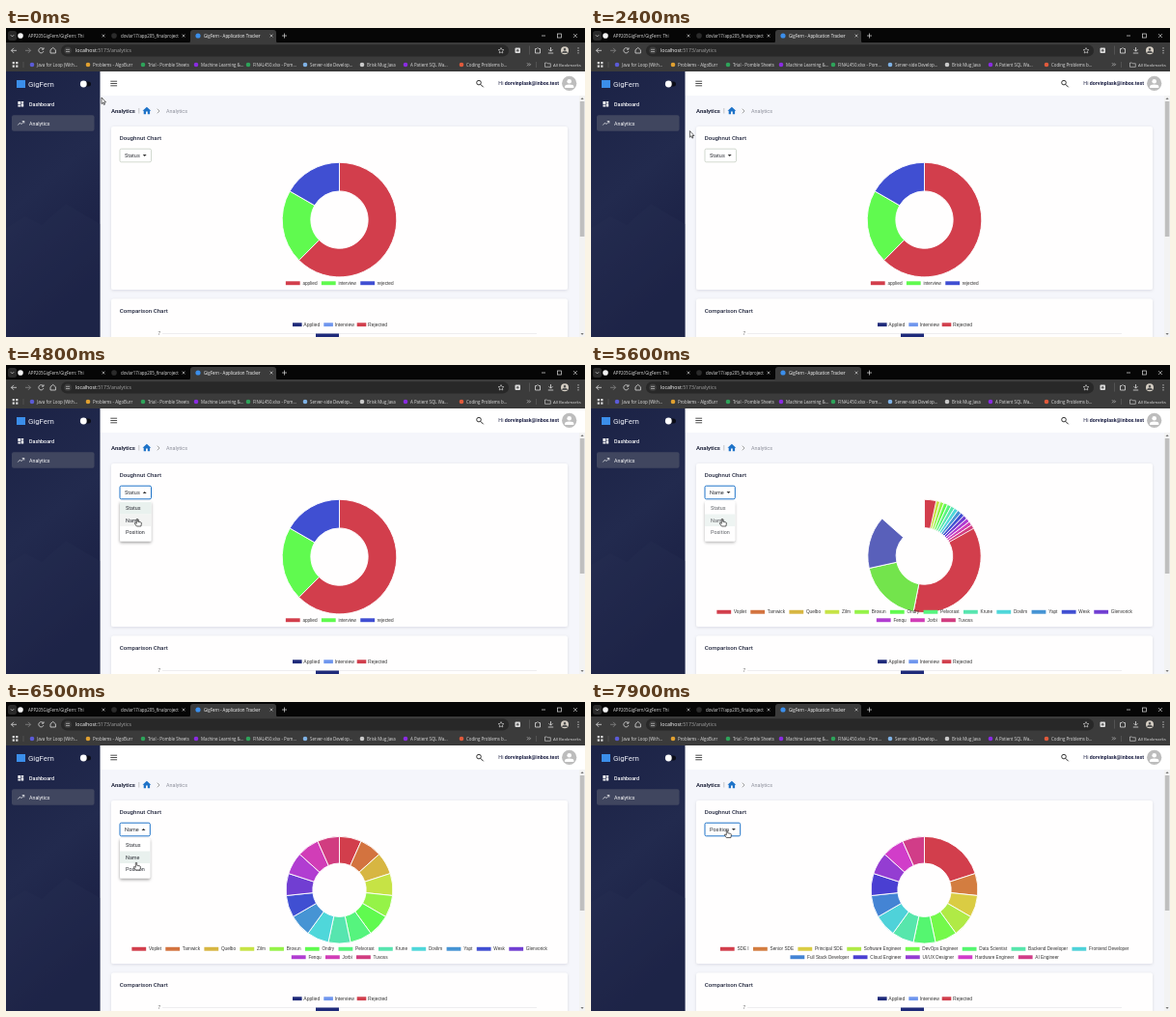
Recreate the animation shown at these times as an HTML page. Size 600 px wide and 320 px high, loop 8 s.

```html
<!DOCTYPE html>
<html lang="en">
<head>
<style>
  html, body { margin: 0; width: 100%; height: 100%; overflow: hidden; background: #f5f6fb; }
  svg { display: block; width: 600px; height: 320px; font-family: Roboto, sans-serif; }
  .chrome { font-family: "Open Sans", sans-serif; }
  .chart { font-family: "Liberation Sans", Arial, sans-serif; }
</style>
</head>
<body>
<svg viewBox="0 0 600 320">
  <defs>
    <linearGradient id="navy" x2=".3" y2="1">
      <stop offset="0" stop-color="#1b2245"/><stop offset=".5" stop-color="#222a4e"/><stop offset="1" stop-color="#191e42"/>
    </linearGradient>
    <filter id="soft" x="-20%" y="-20%" width="140%" height="140%">
      <feDropShadow dx="0" dy=".8" stdDeviation="1.4" flood-color="#223" flood-opacity=".12"/>
    </filter>
    <filter id="lift" x="-30%" y="-30%" width="160%" height="170%">
      <feDropShadow dx="0" dy="1.5" stdDeviation="1.6" flood-opacity=".4"/>
    </filter>
  </defs>
  <g id="page"></g>
  <g id="live"></g>
</svg>
<script>
const LOOP = 8000, STEP = 100, CX = 345.5, BLUE = '#1e73c8', INK = '#23283f';

const text = (x, y, s, size, fill, more = '') =>
  `<text x="${x}" y="${y}" font-size="${size}" fill="${fill}" ${more}>${s}</text>`;
const rect = (x, y, w, h, fill, more = '') =>
  `<rect x="${x}" y="${y}" width="${w}" height="${h}" fill="${fill}" ${more}/>`;
const circle = (x, y, r, fill, more = '') => `<circle cx="${x}" cy="${y}" r="${r}" fill="${fill}" ${more}/>`;
const shape = (d, fill, more = '') => `<path d="${d}" fill="${fill}" ${more}/>`;
const line = (d, stroke, width = .8) => shape(d, 'none', `stroke="${stroke}" stroke-width="${width}"`);
const clamp = v => Math.max(0, Math.min(1, v));
const mix = (a, b, k) => a + (b - a) * k;

function browser() {
  const light = '#dedede', cross = (x, y, r = 1.4) => line(`M${x - r} ${y - r}l${2 * r} ${2 * r}m0 ${-2 * r}l${-2 * r} ${2 * r}`, light, .6);
  const marks = [
    [27, '#5b5bd6', 'Java for Loop (With...'], [85, '#e0a030', 'Problems - AlgoBurr'],
    [142, '#2ea35a', 'Trial - Pomble Sheets'], [197, '#8a2be2', 'Machine Learning &amp;...'],
    [251, '#2ea35a', 'FINAL450.xlsx - Pom...'], [310, '#7fb2e5', 'Server-side Develop...'],
    [369, '#c9c9c9', 'Brisk Mug Java'], [414, '#8a2be2', 'A Patient SQL Wa...'], [472, '#e05a3c', 'Coding Problems b...'],
  ];
  return '<g class="chrome">' + rect(0, 0, 600, 16, '#060606') + rect(0, 15, 600, 30, '#3b3b3b') +
    rect(2, 3, 9, 10, '#2a2a2a', 'rx="2.5"') + line('M4.8 7.2l1.7 1.7 1.7-1.7', light, .7) +
    shape('M188 16q3 0 3-3V5q0-3 3-3H277q3 0 3 3v8q0 3 3 3z', '#3b3b3b') +
    circle(15, 8, 2.8, '#f4f4f4') + text(23, 9.8, 'APP205GigFern/GigFern: Thi', 4.4, light) + cross(101, 8) +
    circle(112, 8, 2.8, '#2b2b2b') + text(119, 9.8, 'dovlar17/app205_finalproject', 4.4, light) + cross(184, 8) +
    circle(199, 8, 2.6, '#3b8eea') + text(205, 9.8, 'GigFern - Application Tracker', 4.4, '#fff') + cross(275, 8) +
    line('M286 8h5m-2.5-2.5v5M555 8h4', light, .7) + rect(571.5, 6, 4, 4, 'none', `stroke="${light}" stroke-width=".7"`) + cross(590, 8, 2) +
    rect(57, 17.2, 464, 12.4, '#282828', 'rx="6.2"') +
    line('M11 23.3H5.5m2.5-2.5l-2.5 2.5 2.5 2.5', light) + line('M20 23.3h5.5m-2.5-2.5l2.5 2.5-2.5 2.5', '#888') +
    line('M38.5 21.7a2.6 2.6 0 1 0 .4 2.4M39 20.3v1.8h-2', light) + line('M46 26v-3.3l2.7-2.3 2.7 2.3V26z', light) +
    circle(64, 23.3, 3.8, '#3d3d3d') + line('M62 22.3h4m-4 2.2h4', light, .6) +
    text(72, 25.3, 'localhost<tspan fill="#a5a5a5">:5173/analytics</tspan>', 5.2, '#fff') +
    line('M513 20.5l.9 1.9 2 .2-1.5 1.4.4 2-1.8-1-1.8 1 .4-2-1.5-1.4 2-.2z', light, .6) +
    rect(527.5, 20.5, 5.5, 5.5, '#ddd', 'rx="1"') + circle(530.2, 23.2, 1.3, '#666') +
    line('M542.5 18.5v9', '#666', .6) + line('M548.5 21.5h1.5q1-2 2 0h1.5v4.5h-5z', light) +
    line('M564.5 20v4m-2-1.8l2 2 2-2M561.8 26h5.4', light) +
    circle(579, 23.3, 4, '#d8d1c6') + shape('M576.2 26a2.8 2.6 0 0 1 5.6 0z', '#555') + circle(579, 22, 1.3, '#555') +
    [20.8, 23.3, 25.8].map(y => circle(593, y, .65, light)).join('') +
    [0, 3.5].map(i => rect(6.7 + i, 35, 2.2, 2.2, light) + rect(6.7 + i, 38.5, 2.2, 2.2, light)).join('') +
    line('M18 35v6M549.5 35v6', '#6a6a6a', .5) +
    marks.map(([x, fill, s]) => circle(x, 38, 2.3, fill) + text(x + 5, 39.7, s, 4.4, light)).join('') +
    line('M540 36.3l1.5 1.5-1.5 1.5m2-3l1.5 1.5-1.5 1.5', light, .6) +
    line('M558.5 36h2l.8.8h3V40.3h-5.8z', light, .6) + text(567, 39.7, 'All Bookmarks', 4.3, light) + '</g>';
}

function sidebar() {
  return rect(0, 45, 97.5, 275, 'url(#navy)') +
    shape('M0 207l20-12 17 9 25-22 35.5 21V320H0z', '#262e52', 'opacity=".35"') +
    rect(11, 54, 9, 8, '#3b8eea') + text(23, 61, 'GigFern', 7.8, '#eef0f8') +
    rect(78, 55.6, 10, 5, '#0b0d18', 'rx="2.5"') + circle(80.3, 58, 3.4, '#fff') +
    rect(12.4, 76, 2.7, 3.2, '#fff') + rect(12.4, 79.8, 2.7, 1.7, '#fff') +
    rect(15.7, 76, 2.5, 1.7, '#fff') + rect(15.7, 78.3, 2.5, 3.2, '#fff') +
    text(24, 80.8, 'Dashboard', 5.35, '#fff', 'font-weight="500"') +
    rect(6, 90.3, 85.5, 16.5, '#40465f', 'rx="2"') +
    line('M12.3 100.5l2.2-2.3 1.4 1.4 2.8-3m-2-.1h2.1v2.1', '#fff', .7) +
    text(24, 100.5, 'Analytics', 5.3, '#fff');
}

function content() {
  const key = (x, fill, s) => rect(x, 305.3, 9.6, 3.8, fill) + text(x + 11.3, 309, s, 5.1, '#333');
  return rect(97.5, 45, 502.5, 275, '#f5f6fb') + rect(97.5, 45, 502.5, 25, '#fff') +
    line('M108.3 55.2h6.8m-6.8 2.3h6.8m-6.8 2.3h6.8', '#222', .8) +
    circle(490, 56.6, 2.3, 'none', 'stroke="#222" stroke-width=".9"') + line('M491.7 58.3l3 3', '#222', 1) +
    text(573, 59.3, 'Hi <tspan font-weight="700">dorvinplask@inbox.test</tspan>', 5.3, '#1d2145', 'text-anchor="end"') +
    circle(583.7, 57.4, 7.6, '#bdbdbd') + circle(583.7, 55.3, 2.3, '#fff') + shape('M579 62v-1.2q0-2.4 4.7-2.4t4.7 2.4V62z', '#fff') +
    text(109, 88, 'Analytics', 6, '#20253c', 'font-weight="700"') + line('M137.8 83v5.5', '#999', .5) +
    shape('M141.5 85.8l4.4-4 4.4 4h-1.2v3.4h-2.3v-2.6h-1.8v2.6h-2.3v-3.4z', BLUE) +
    line('M156.8 83.7l2.3 2.3-2.3 2.3', '#888', .8) + text(166, 88, 'Analytics', 5.4, '#8b8e99') +
    rect(109, 102, 473, 169, '#fffefe', 'rx="2.5" filter="url(#soft)"') +
    rect(109, 280.5, 473, 50, '#fffefe', 'rx="2.5" filter="url(#soft)"') +
    text(117.7, 116.2, 'Doughnut Chart', 6.15, INK, 'font-weight="500"') +
    text(117.7, 294.6, 'Comparison Chart', 6.15, INK, 'font-weight="500"') +
    '<g class="chart">' + key(297, '#1e2a7a', 'Applied') + key(329.3, '#6f96ee', 'Interview') + key(363.7, '#d13f4d', 'Rejected') +
    text(157.5, 318, '7', 4.7, '#666') + line('M162 316.5H550', '#e3e3e6', .6) + rect(321, 316.5, 24, 4, '#1e2a7a') + '</g>' +
    rect(594, 70, 6, 250, '#f3f3f3') + rect(594.8, 76, 4.6, 140, '#bfbfbf') +
    shape('M595.5 74l1.6-2 1.6 2zM595.5 316l1.6 2 1.6-2z', '#777');
}

// Colour wheel position t (0..1) to fill, strongest around green.
function wheel(t) {
  const bump = (mid, width) => Math.exp(-(((t - mid) / width) ** 2));
  const hue = 354 + 360 * t + 5 * Math.sin(3 * Math.PI * t);
  return `hsl(${hue % 360}, ${62 + 33 * bump(.333, .13)}%, ${53 + 12 * bump(.37, .18)}%)`;
}

function makeView(name, labels, weights, perRow, cy, r, width) {
  const total = weights.reduce((a, b) => a + b);
  let sum = 0;
  const arcs = weights.map((w, i) => ({ start: sum / total, end: (sum += w) / total, fill: wheel(i / labels.length) }));
  return { name, labels, arcs, perRow, cy, r, width };
}

const companies = ['Voplet', 'Tarnwick', 'Quelbo', 'Zilm', 'Brovun', 'Ondry', 'Pelvorast', 'Krune', 'Dovlim',
  'Yapt', 'Wesk', 'Glenvorick', 'Fenqu', 'Jorbi', 'Tuvoss'];
const roles = ['SDE I', 'Senior SDE', 'Principal SDE', 'Software Engineer', 'DevOps Engineer', 'Data Scientist',
  'Backend Developer', 'Frontend Developer', 'Full Stack Developer', 'Cloud Engineer', 'UI/UX Designer',
  'Hardware Engineer', 'AI Engineer'];
const views = [
  makeView('Status', ['applied', 'interview', 'rejected'], [15, 5, 4], 3, 198.6, 59.3, 32.5),
  makeView('Name', companies, companies.map(() => 1), 12, 194.7, 55.4, 31.3),
  makeView('Position', roles, roles.map((_, i) => i ? 1 : 3), 8, 194.7, 55.4, 36.7),
];

function doughnut(from, to, k) {
  const cy = mix(from.cy, to.cy, k), r = mix(from.r, to.r, k);
  const at = (turn, rad) => {
    const a = turn * 2 * Math.PI;
    return `${(CX + rad * Math.sin(a)).toFixed(2)} ${(cy - rad * Math.cos(a)).toFixed(2)}`;
  };
  return to.arcs.map((b, i) => {
    const a = from.arcs[i] || { start: 0, end: 0, fill: b.fill };
    const s = mix(a.start, b.start, k), e = mix(a.end, b.end, k), big = +(e - s > .5);
    if (e - s < .001) return '';
    return shape(`M${at(s, r)}A${r} ${r} 0 ${big} 1 ${at(e, r)}L${at(e, r / 2)}A${r / 2} ${r / 2} 0 ${big} 0 ${at(s, r / 2)}z`,
      k === 1 ? b.fill : `color-mix(in srgb, ${b.fill} ${k * 100}%, ${a.fill})`, 'stroke="#fff" stroke-width=".9"');
  }).join('');
}

const ruler = document.createElement('canvas').getContext('2d');
ruler.font = '47px "Liberation Sans", Arial, sans-serif';

function legend({ labels, arcs, perRow }) {
  const size = 4.7, box = 15.6, gap = 3.9, rows = Math.ceil(labels.length / perRow);
  const span = s => box + size / 2 + ruler.measureText(s).width / 10;
  let out = '';
  for (let row = 0; row < rows; row++) {
    const items = labels.slice(row * perRow, (row + 1) * perRow), y = 264.3 - (rows - 1 - row) * 8.5;
    let x = CX - (items.reduce((w, s) => w + span(s), 0) + gap * (items.length - 1)) / 2;
    items.forEach((s, i) => {
      out += rect(x + .4, y - 2, box - .8, 3.9, arcs[row * perRow + i].fill) + text(x + box + size / 2, y + 1.6, s, size, '#333');
      x += span(s) + gap;
    });
  }
  return `<g class="chart">${out}</g>`;
}

function select(view, open, focused) {
  const x = 118 + view.width - 6.8, dir = open ? -1 : 1;
  return rect(118, 125.2, view.width, 13.6, '#fff', `rx="1.5" stroke="${focused ? BLUE : '#b4bfb0'}" stroke-width="${focused ? 1 : .6}"`) +
    text(123, 134, view.name, 5.5, '#2c2f36') +
    shape(`M${x - 2} ${132 - dir}h4l-2 ${2 * dir}z`, '#333');
}

function menu(view, hovered, opacity) {
  return `<g opacity="${opacity}">` + rect(118, 141, view.width, 41.5, '#fff', 'rx="1.5" filter="url(#lift)"') +
    views.map((v, i) => {
      const y = 142 + i * 12.5, fill = v === view ? '#e9f1ee' : i === hovered ? '#f2f3f2' : 'none';
      return rect(118, y, view.width, 12.5, fill) + text(124, y + 8, v.name, 5.45, '#2c2f36');
    }).join('') + '</g>';
}

// Pointer stops: time, x, y of the tip.
const stops = [[300, 99, 72], [400, 99, 95], [1300, 99, 95], [1400, 100, 109], [2100, 100, 109], [2600, 104, 105],
  [3000, 230, 97], [3500, 268, 93], [3600, 268, 93], [4000, 138, 131], [4700, 138, 131], [4800, 136, 159],
  [5600, 136, 159], [6000, 135, 131.5], [6400, 135, 132], [6500, 135, 166], [6700, 135, 166], [6800, 136, 173],
  [7100, 136, 173], [7500, 141, 132.5]];

function pointer(t) {
  const next = stops.findIndex(s => s[0] >= t);
  const b = stops[next < 0 ? stops.length - 1 : next], a = next > 0 ? stops[next - 1] : b;
  const k = a === b ? 1 : (t - a[0]) / (b[0] - a[0]);
  const arrow = 'M0 0v6.6l1.5-1.4 1 2.3 1-.4-1-2.2h2z';
  const hand = 'M-.7.6q.7-1 1.4 0v2.6l3 .7q.8.2.7 1.1l-.5 3H-.6l-2-2.7q-.3-.9.7-.7l1.2.7z';
  return `<g transform="translate(${mix(a[1], b[1], k)} ${mix(a[2], b[2], k)})">` +
    shape(t >= 4000 ? hand : arrow, '#fff', 'stroke="#111" stroke-width=".65"') + '</g>';
}

function scene(t) {
  const picks = [[5555, 0, 1], [7000, 1, 2]];
  const [when, from, to] = picks.filter(p => t >= p[0]).pop() || [-LOOP, 0, 0];
  const p = clamp((t - when) / 1000), view = views[to];
  const shown = (open, close) => clamp((t - open) / 200) * clamp((close - t) / 200);
  const opacity = shown(4150, 5750) + shown(6200, 7200);
  const open = t >= 4200 && t < 5555 || t >= 6300 && t < 7000;
  const hovered = t >= 6800 ? 2 : t >= 4800 && t < 5800 ? 1 : -1;
  return doughnut(views[from], view, 1 - (1 - p) ** 4) + legend(view) + select(view, open, t >= 4200) +
    (opacity ? menu(view, hovered, opacity) : '') + pointer(t);
}

const live = document.getElementById('live');
document.getElementById('page').innerHTML = content() + sidebar() + browser();
let last = -1;
function tick() {
  const t = Math.floor(performance.now() % LOOP / STEP) * STEP;
  if (t !== last) live.innerHTML = scene(last = t);
  requestAnimationFrame(tick);
}
tick();
</script>
</body>
</html>
```
